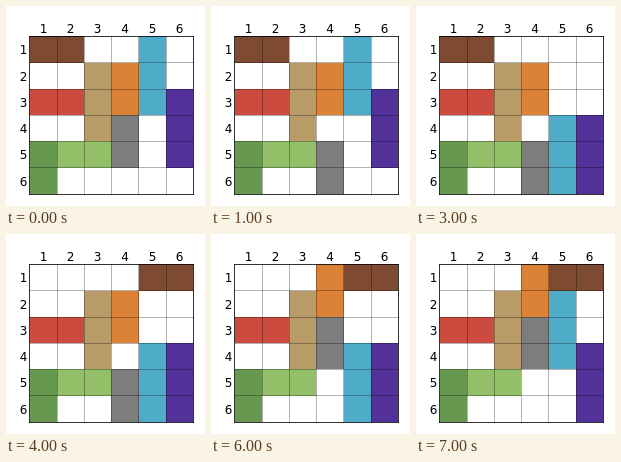
Animation, 199 px wide and 200 px high, one loop 8000 ms. Source, as an HTML page:

```html
<!DOCTYPE html>
<html lang="en">
<head>
<meta charset="utf-8">
<title>Sliding blocks</title>
<style>
  html, body { margin: 0; width: 100%; height: 100%; overflow: hidden; background: #fff; }
  svg { display: block; width: 199px; height: 200px; }
  text { font: 12px "DejaVu Sans", sans-serif; fill: #000; }
</style>
</head>
<body>
<svg id="board" viewBox="0 0 199 200"></svg>
<script>
const STEP = 1000, STEPS = 8;
// Cell boundaries and the pixel each rule occupies.
const X = [24, 51, 78, 105, 133, 160, 187], Y = [30, 57, 83, 109, 135, 162, 188];
const RULE_X = [23, 51, 78, 105, 132, 160, 187], RULE_Y = [30, 56, 83, 109, 135, 161, 188];

// col, row, width, height, colour, moves as [step, col, row]
const blocks = [
  [0, 0, 2, 1, '#7f4a32', [[4, 4, 0]]],
  [0, 2, 2, 1, '#cb4b3e', []],
  [2, 1, 1, 3, '#b99b67', []],
  [3, 1, 1, 2, '#db8236', [[5, 3, 0]]],
  [4, 0, 1, 3, '#4facc9', [[3, 4, 3], [7, 4, 1]]],
  [5, 2, 1, 3, '#523199', [[2, 5, 3]]],
  [3, 3, 1, 2, '#7d7d7d', [[1, 3, 4], [6, 3, 2]]],
  [0, 4, 1, 2, '#66984f', []],
  [1, 4, 2, 1, '#94bf69', []]
];

const board = document.getElementById('board');

function add(tag, attrs) {
  const el = document.createElementNS('http://www.w3.org/2000/svg', tag);
  for (const key in attrs) el.setAttribute(key, attrs[key]);
  return board.appendChild(el);
}

function rect(x, y, width, height, fill, opacity = 1) {
  return add('rect', { x, y, width, height, fill, 'fill-opacity': opacity });
}

function label(value, x, y, anchor) {
  add('text', { x, y, 'text-anchor': anchor }).textContent = value;
}

function place(el, [, , w, h], col, row) {
  el.setAttribute('x', X[col]);
  el.setAttribute('y', Y[row]);
  el.setAttribute('width', X[col + w] - X[col]);
  el.setAttribute('height', Y[row + h] - Y[row]);
}

const shapes = blocks.map(b => rect(0, 0, 0, 0, b[4]));

for (let i = 0; i < 7; i++) {
  const alpha = i % 6 ? 0.3 : 0.8;
  rect(RULE_X[i], 30, 1, 159, '#000', alpha);
  rect(23, RULE_Y[i], 165, 1, '#000', alpha);
}

for (let i = 0; i < 6; i++) {
  label(i + 1, (X[i] + X[i + 1]) / 2, 27, 'middle');
  label(i + 1, 21.5, (Y[i] + Y[i + 1]) / 2 + 4.5, 'end');
}

let shown = -1;
function draw(now) {
  const step = Math.floor(now / STEP) % STEPS;
  if (step !== shown) {
    shown = step;
    blocks.forEach((b, i) => {
      let [col, row] = b;
      for (const [at, c, r] of b[5]) if (step >= at) [col, row] = [c, r];
      place(shapes[i], b, col, row);
    });
  }
}

const start = performance.now();
function tick() {
  draw(performance.now() - start);
  requestAnimationFrame(tick);
}
tick();
</script>
</body>
</html>
```
